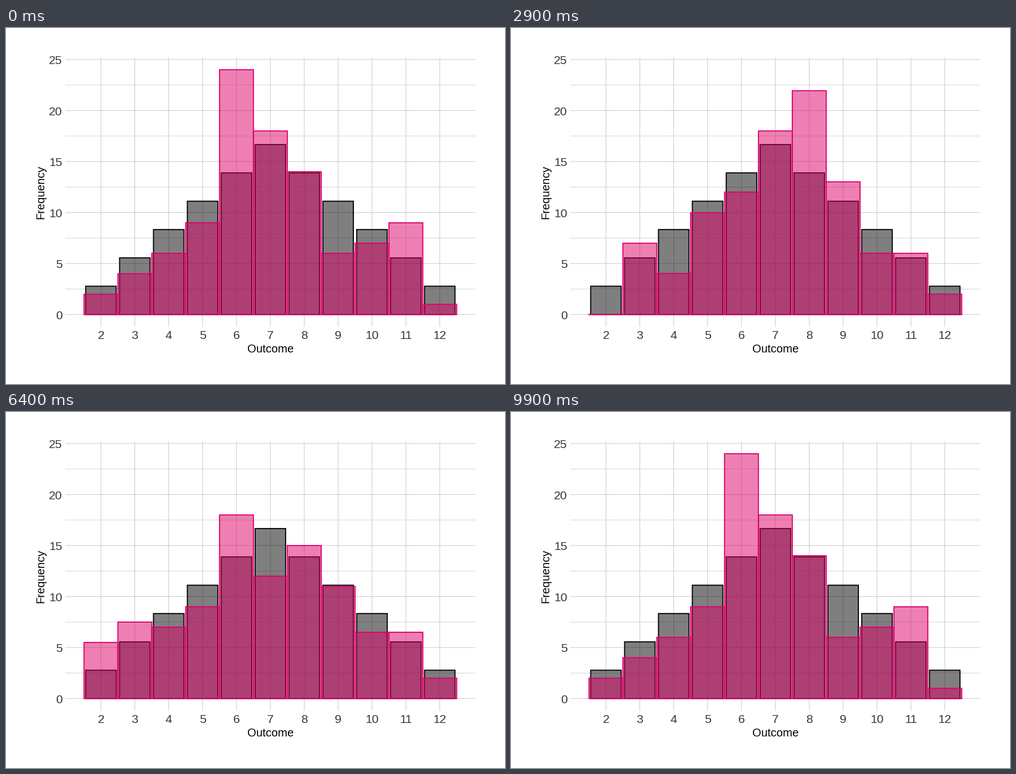
Recreate the animation shown at these times as a matplotlib script. Size 885x632 px, loop 10 s.

```python
import numpy as np
import matplotlib.pyplot as plt
from matplotlib.animation import FuncAnimation
from matplotlib.patches import Rectangle

W, H, DPI = 885, 632, 64
PX = 72 / DPI                      # points per pixel
FRAMES, INTERVAL = 100, 100
PINK = "#de0069"

OUTCOMES = np.arange(2, 13)
EXPECTED = (6 - np.abs(OUTCOMES - 7)) / 36 * 100

# Each row is one simulated run of 100 rolls; the last run returns to the first.
RUNS = np.array([
    [2, 4, 6, 9, 24, 18, 14, 6, 7, 9, 1],
    [0, 4, 5, 14, 17, 17, 19, 8, 9, 3, 4],
    [3, 5, 11, 7, 14, 19, 8, 15, 8, 7, 3],
    [0, 7, 4, 10, 12, 18, 22, 13, 6, 6, 2],
    [3, 6, 7, 11, 15, 16, 18, 11, 7, 4, 2],
    [6, 6, 6, 13, 21, 11, 10, 11, 8, 2, 6],
    [7, 5, 4, 11, 15, 13, 20, 12, 5, 6, 2],
    [4, 10, 10, 7, 21, 11, 10, 10, 8, 7, 2],
    [4, 7, 15, 12, 17, 14, 9, 9, 8, 4, 1],
    [3, 6, 1, 7, 15, 21, 21, 6, 9, 8, 3],
])
KEYS = [0, 10, 20, 30, 40, 49, 59, 69, 79, 89, 99]

plt.rcParams["font.family"] = "Liberation Sans"


def px(x):
    return 168.4 + (x - 2) * 60.09


def py(y):
    return 508.7 - y * 18.108


def ease(p):
    return 4 * p ** 3 if p < 0.5 else 1 - 4 * (1 - p) ** 3


def counts(frame):
    i = min(np.searchsorted(KEYS, frame, side="right") - 1, len(RUNS) - 1)
    q = ease((frame - KEYS[i]) / (KEYS[i + 1] - KEYS[i]))
    a, b = RUNS[i], RUNS[(i + 1) % len(RUNS)]
    return a + (b - a) * q


fig = plt.figure(figsize=(W / DPI, H / DPI), dpi=DPI, facecolor="white")
ax = fig.add_axes([0, 0, 1, 1])
ax.set(xlim=(0, W), ylim=(H, 0))
ax.axis("off")


def grid_line(xs, ys, width):
    ax.plot(xs, ys, color="#c8c8c8", lw=width * PX, zorder=1,
            solid_capstyle="butt", snap=False)


def label(x, y, text, size, color, **kw):
    ax.text(x, y, text, fontsize=size * PX, color=color,
            va="baseline", rotation_mode="anchor", **kw)


def make_bars(heights, width, edge, fill, zorder):
    bars = []
    for x, h in zip(OUTCOMES, heights):
        left, right = px(x - width / 2), px(x + width / 2)
        bar = Rectangle((left, py(0)), right - left, py(h) - py(0),
                        facecolor=fill, edgecolor=edge, lw=1.9 * PX,
                        joinstyle="miter", snap=False, zorder=zorder)
        bars.append(ax.add_patch(bar))
    return bars


x_span = px(0.95), px(13.05)
y_span = py(-1.2), py(25.2)
for v in np.arange(2.5, 25, 5):
    grid_line(x_span, (py(v), py(v)), 0.75)
for v in range(0, 26, 5):
    grid_line(x_span, (py(v), py(v)), 1.0)
    label(100, py(v) + 8.2, str(v), 21.3, "#383838", ha="right")
for v in OUTCOMES:
    grid_line((px(v), px(v)), y_span, 1.0)
    label(px(v), 551.6, str(v), 21.3, "#383838", ha="center")

label(468.8, 575.6, "Outcome", 20.2, "black", ha="center")
label(67.3, 291.4, "Frequency", 20.2, "black", ha="center", rotation=90)

make_bars(EXPECTED, 0.9, "black", (0, 0, 0, 0.5), 2)
rolled = make_bars(RUNS[0], 1.0, PINK, (222 / 255, 0, 105 / 255, 0.5), 3)


def update(frame):
    for bar, n in zip(rolled, counts(frame)):
        bar.set_height(py(n) - py(0))
    return rolled


anim = FuncAnimation(fig, update, frames=FRAMES, interval=INTERVAL,
                     init_func=lambda: update(0), repeat=True, repeat_delay=0)
plt.show()
```
